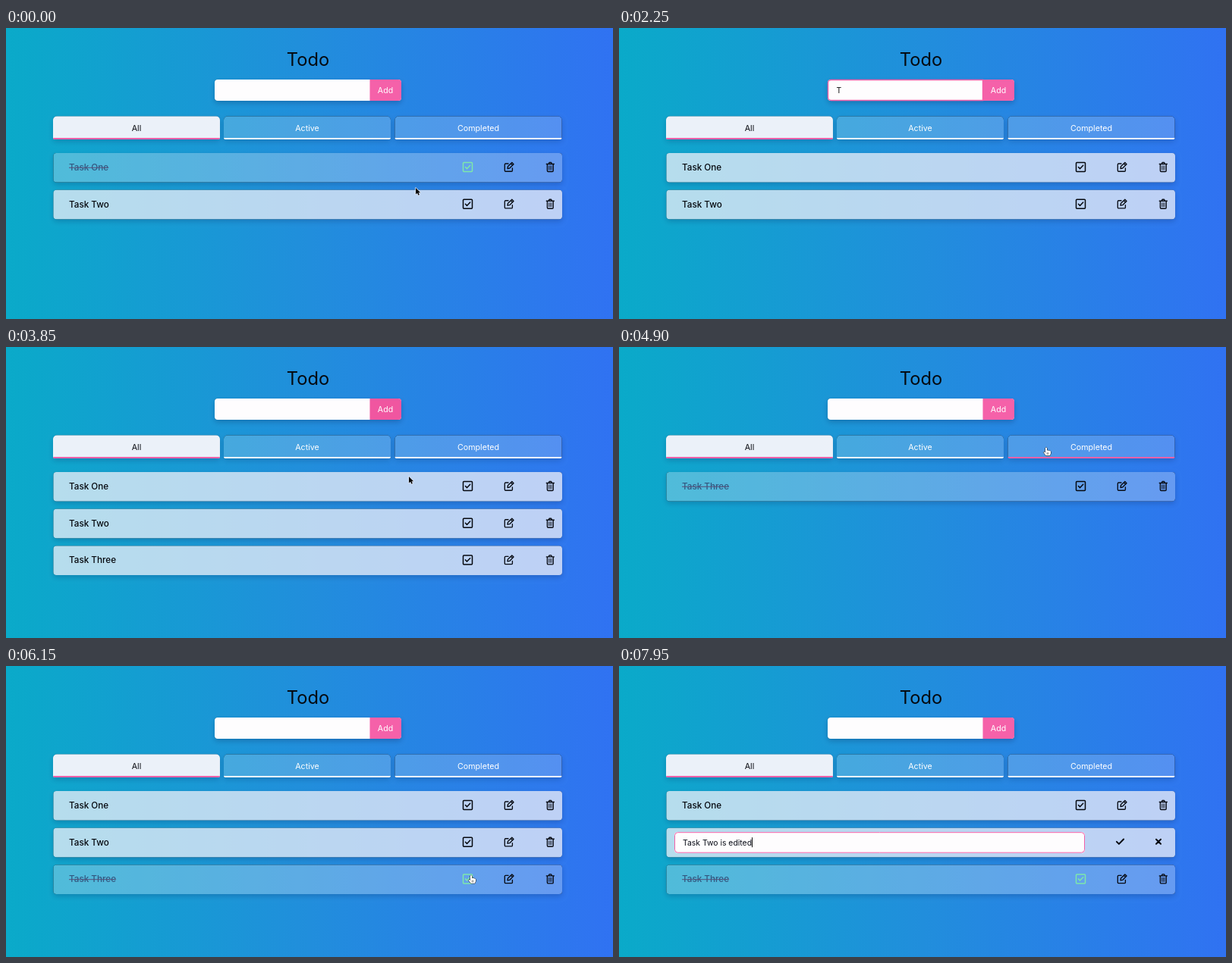
An HTML page with a canvas for the animation above (8000 ms loop, 800 by 384 pixels).

```html
<!DOCTYPE html>
<html lang="en">
<head>
<meta charset="utf-8">
<title>Todo</title>
<style>
html, body { margin: 0; width: 100%; height: 100%; overflow: hidden; background: #1d8edd; }
canvas { display: block; width: 100vw; height: 100vh; }
</style>
</head>
<body>
<canvas id="stage"></canvas>
<script>
const W = 800, H = 384, LOOP = 8000, STEP = 50;
const PINK = '#f561a9', WHITE = '#fefdfe', GREEN = [126, 232, 170];
const canvas = document.getElementById('stage');
const ctx = canvas.getContext('2d');
const dpr = window.devicePixelRatio || 1;
canvas.width = W * dpr;
canvas.height = H * dpr;

const clamp = v => Math.max(0, Math.min(1, v));
const mix = (a, b, k) => a + (b - a) * k;
const fade = (t, start, length = 150) => clamp((t - start) / length);
const rgb = (a, b, k) => `rgb(${a.map((v, i) => Math.round(mix(v, b[i], k)))})`;
const within = (p, x, y, w, h) => p && p.x >= x && p.x <= x + w && p.y >= y && p.y <= y + h;

const ADD_TASK = 3500, SHOW_DONE = 4870, SHOW_ALL = 5500, EDIT = 6800;
const TABS = [['All', 62], ['Active', 287], ['Completed', 512.5]];

// Pointer stops: time, x, y of the hot spot
const STOPS = [
  [0, 540, 211], [350, 606, 181], [650, 606, 181], [1150, 463.5, 130],
  [1550, 390, 80], [3250, 390, 80], [3440, 500, 80], [3620, 500, 80],
  [3850, 531, 171], [4150, 607, 278], [4330, 607, 278], [4800, 563, 132.5],
  [5000, 563, 132.5], [5420, 190, 130], [5580, 190, 130], [6100, 613, 276],
  [6350, 613, 276], [6650, 662, 229], [8000, 662, 229]
];

function slope(i, axis) {
  const a = STOPS[i - 1], b = STOPS[i], c = STOPS[i + 1];
  if (!a || !c) return 0;
  const before = (b[axis] - a[axis]) / (b[0] - a[0]);
  const after = (c[axis] - b[axis]) / (c[0] - b[0]);
  return before * after <= 0 ? 0 : 2 * before * after / (before + after);
}

function pointerAt(t) {
  if ((t >= 2150 && t < 3250) || t >= 6900) return null;
  let i = 0;
  while (i < STOPS.length - 2 && t >= STOPS[i + 1][0]) i++;
  const a = STOPS[i], b = STOPS[i + 1], d = b[0] - a[0];
  const u = (t - a[0]) / d, u2 = u * u, u3 = u2 * u;
  const at = n => (2 * u3 - 3 * u2 + 1) * a[n] + (3 * u2 - 2 * u3) * b[n] +
    d * ((u3 - 2 * u2 + u) * slope(i, n) + (u3 - u2) * slope(i + 1, n));
  return { x: at(1), y: at(2) };
}

function label(text, x, y, size, color, weight = 400, align = 'left') {
  ctx.font = `${weight} ${size}px Inter, "Open Sans", sans-serif`;
  ctx.textAlign = align;
  ctx.textBaseline = 'alphabetic';
  ctx.fillStyle = color;
  ctx.fillText(text, x, y);
  return ctx.measureText(text).width;
}

function box(x, y, w, h, radius, fill, shadow = 0) {
  const path = new Path2D();
  path.roundRect(x, y, w, h, radius);
  if (shadow) {
    // Keep the shadow from showing through a translucent panel
    const outside = new Path2D(path);
    outside.rect(0, 0, W, H);
    ctx.save();
    ctx.clip(outside, 'evenodd');
    ctx.shadowColor = `rgba(10,40,90,${shadow})`;
    ctx.shadowBlur = 7 * dpr;
    ctx.shadowOffsetY = 3 * dpr;
    ctx.fillStyle = '#000';
    ctx.fill(path);
    ctx.restore();
  }
  ctx.fillStyle = fill;
  ctx.fill(path);
}

function line(d, x, y, color, width = 1.5) {
  ctx.save();
  ctx.translate(x, y);
  ctx.strokeStyle = color;
  ctx.lineWidth = width;
  ctx.lineCap = ctx.lineJoin = 'round';
  ctx.stroke(new Path2D(d));
  ctx.restore();
}

const ICONS = {
  check: 'M-5 -6H5Q6 -6 6 -5V5Q6 6 5 6H-5Q-6 6 -6 5V-5Q-6 -6 -5 -6ZM-3 0L-1 2.2L3.2 -2.2',
  edit: 'M-1 -4.5H-4.5Q-5.7 -4.5 -5.7 -3.3V4.5Q-5.7 5.7 -4.5 5.7H3.2Q4.4 5.7 4.4 4.5V1.5' +
    'M-2 2L-1.6 -.7L3.8 -6L6 -3.8L.7 1.5ZM2.4 -4.5L4.5 -2.4',
  trash: 'M-5 -4H5M-2 -4.3L-1.3 -6H1.3L2 -4.3M-3.9 -3.8V4.8Q-3.9 6 -2.7 6H2.7Q3.9 6 3.9 4.8V-3.8',
  bars: 'M-1.7 -1.5V3.6M0 -1.5V3.6M1.7 -1.5V3.6',
  tick: 'M-4.6 .4L-1.6 3.4L4.6 -3',
  cross: 'M-3 -3L3 3M3 -3L-3 3'
};

function caret(x, y, t) {
  if (t % 1000 < 500) return;
  ctx.fillStyle = '#111';
  ctx.fillRect(Math.round(x), y, 1, 13);
}

function drawHeader(t, pointer) {
  label('Todo', 398, 50, 23.7, '#050a10', 400, 'center');

  box(275, 68, 246, 28, 4, WHITE, 0.3);
  const hover = fade(t, 3400) * (1 - fade(t, 3780));
  box(479.5, 68, 41.5, 28, [0, 4, 4, 0], rgb([245, 97, 169], [236, 76, 153], hover));
  label('Add', 500, 86, 10.6, '#fff', 400, 'center');

  if (t >= 1600 && t < ADD_TASK) {
    ctx.strokeStyle = PINK;
    ctx.lineWidth = 1.4;
    ctx.beginPath();
    ctx.roundRect(275.5, 68.5, 204, 27, [4, 0, 0, 4]);
    ctx.stroke();
    const count = t < 2200 ? 0 : Math.floor((t - 2200) / 105) + 1;
    const width = label('Task Three'.slice(0, count), 286.5, 86, 10.4, '#111');
    caret(287 + width, 75.5, t);
  }

  const away = fade(t, 4900) * (1 - fade(t, SHOW_ALL + 20));
  TABS.forEach(([name, x], i) => {
    const on = i === 0 ? 1 - away : i === 2 ? away : 0;
    const hovered = within(pointer, x, 117, 220, 30);
    box(x, 116.5, 220, 30.5, [5, 5, 2, 2], `rgba(240,243,250,${mix(0.2, 0.98, on)})`, 0.24);
    box(x, 145, 220, 2, [0, 0, 2, 2], hovered || on > 0.5 ? PINK : '#fbfcff');
    label(name, x + 110, 135.5, 10.7, rgb([255, 255, 255], [8, 10, 16], on), 400, 'center');
  });
}

function drawRow(y, name, done, green) {
  const alpha = mix(0.74, 0.29, done);
  box(62.5, y, 670.5, 38.5, 4, `rgba(240,240,249,${alpha})`, 0.25);
  const mid = y + 18.5;
  const ink = rgb([5, 8, 14], [50, 88, 128], done);
  const width = label(name, 83, mid + 4.4, 11.7, ink, 500);
  if (done) {
    ctx.globalAlpha = done;
    ctx.fillStyle = '#574f78';
    ctx.fillRect(83, mid + 0.3, width, 1);
    ctx.globalAlpha = 1;
  }
  line(ICONS.check, 608.5, mid, rgb([5, 8, 14], GREEN, green), 1.5);
  line(ICONS.edit, 663, mid, '#080c14', 1.35);
  line(ICONS.trash, 717.3, mid, '#080c14', 1.4);
  line(ICONS.bars, 717.3, mid, '#080c14', 0.8);
}

function drawEditor(y, t) {
  box(62.5, y, 670.5, 38.5, 4, 'rgba(240,240,249,.74)', 0.25);
  box(73, y + 5.5, 541, 27.5, 4, WHITE);
  ctx.strokeStyle = PINK;
  ctx.lineWidth = 1;
  ctx.beginPath();
  ctx.roundRect(73.5, y + 6, 540, 26.5, 4);
  ctx.stroke();
  const count = Math.max(0, Math.floor((t - 6900) / 95));
  const width = label('Task Two' + ' is edited'.slice(0, count), 84, y + 22.8, 10.4, '#0a0d18');
  caret(84 + width, y + 12.5, t);
  line(ICONS.tick, 660.5, y + 17.8, '#050810', 2);
  line(ICONS.cross, 711, y + 18, '#050810', 2);
}

function drawList(t) {
  const rowY = i => 165 + i * 48.7;
  const doneOne = 1 - fade(t, 500);
  const doneThree = fade(t, 4220);
  if (t >= SHOW_DONE && t < SHOW_ALL) {
    drawRow(rowY(0), 'Task Three', 1, fade(t, 4900));
    return;
  }
  drawRow(rowY(0), 'Task One', doneOne, doneOne);
  if (t >= EDIT) drawEditor(rowY(1), t);
  else drawRow(rowY(1), 'Task Two', 0, 0);
  if (t >= ADD_TASK) drawRow(rowY(2), 'Task Three', doneThree, doneThree);
}

const ARROW = new Path2D('M0 0V8.6L2 6.8L3.4 9.8L4.9 9.1L3.6 6.2H6.2Z');
const HAND = new Path2D('M-1 .8Q0 -.6 1 .8V4Q2 3.2 2.8 4.2Q3.8 3.6 4.5 4.7Q6 4.3 6 5.8V8' +
  'L5 10.8H-.4L-3.2 7Q-3.6 5.6 -2.2 5.9L-1 7Z');

function drawPointer(p) {
  if (!p) return;
  if (within(p, 275, 68, 204, 28)) {
    line('M-1.5 -5H1.5M0 -5V5M-1.5 5H1.5', p.x, p.y, '#222', 1);
    return;
  }
  const onTab = TABS.some(([, x]) => within(p, x, 117, 220, 30));
  const onIcon = [608, 663, 717].some(x => Math.abs(p.x - x) < 9) &&
    [184, 232, 281].some(y => Math.abs(p.y - y) < 9);
  const hand = onTab || onIcon || within(p, 479, 68, 42, 28);
  ctx.save();
  ctx.translate(p.x, p.y);
  ctx.lineJoin = 'round';
  ctx.lineWidth = hand ? 1 : 1.3;
  ctx.strokeStyle = hand ? '#111' : '#e8eefc';
  ctx.fillStyle = hand ? '#fff' : '#080808';
  ctx.stroke(hand ? HAND : ARROW);
  ctx.fill(hand ? HAND : ARROW);
  if (hand) line('M1.2 7V9M2.8 7V9', 0, 0, '#333', 0.6);
  ctx.restore();
}

const sky = ctx.createLinearGradient(0, 0, W, 0);
sky.addColorStop(0, '#0aaac9');
sky.addColorStop(0.5, '#218edc');
sky.addColorStop(1, '#3072f2');

function draw(now) {
  const t = Math.floor((now % LOOP) / STEP) * STEP;
  const pointer = pointerAt(t);
  ctx.setTransform(dpr, 0, 0, dpr, 0, 0);
  ctx.fillStyle = sky;
  ctx.fillRect(0, 0, W, H);
  drawHeader(t, pointer);
  drawList(t);
  drawPointer(pointer);
}

let start;
function tick(now) {
  start ??= now;
  draw(now - start);
  requestAnimationFrame(tick);
}
draw(0);
requestAnimationFrame(tick);
</script>
</body>
</html>
```
